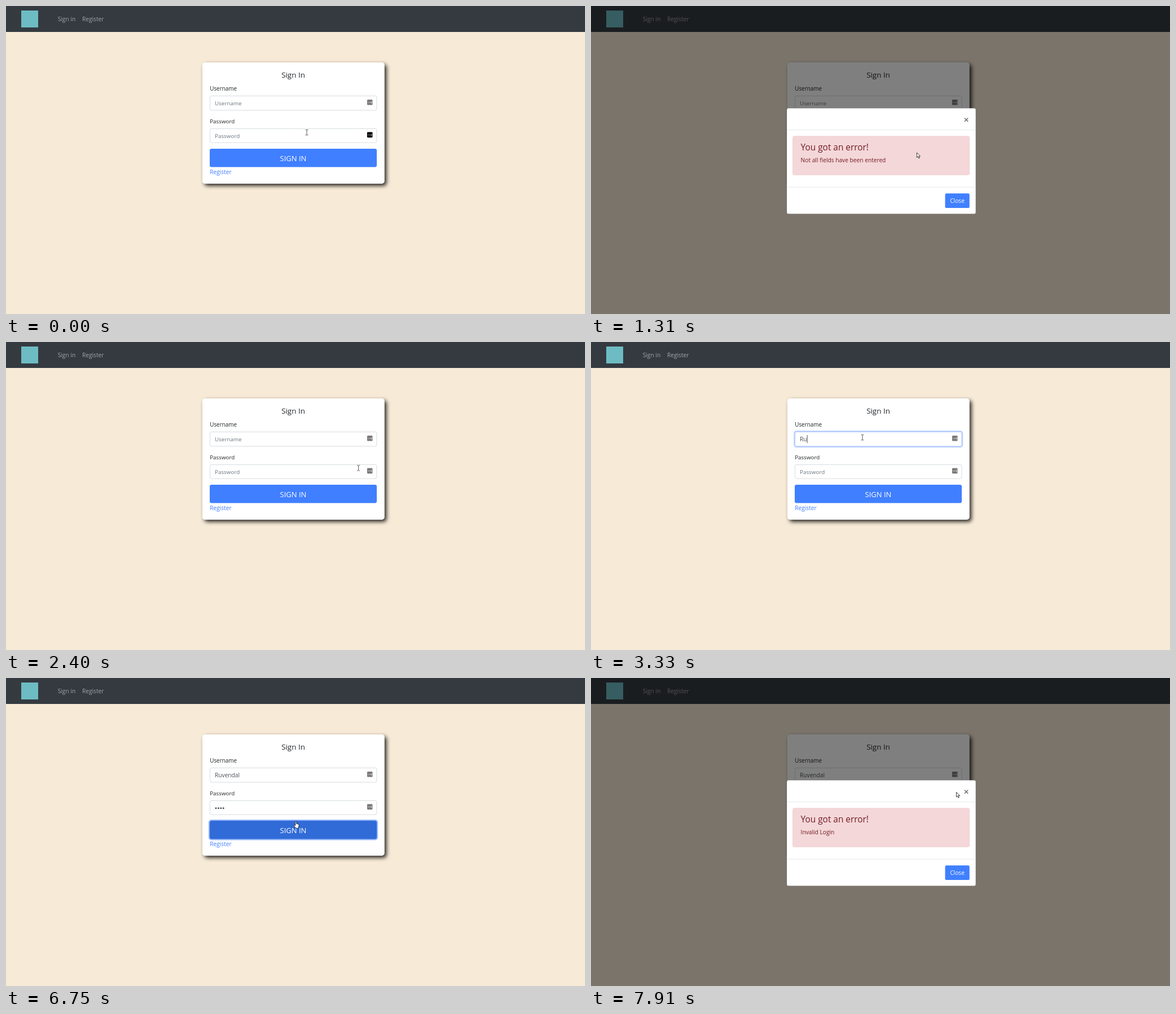
Recreate the animation shown at these times as an HTML page. Size 1026 px wide and 546 px high, loop 8000 ms.

```html
<!DOCTYPE html>
<html lang="en">
<head>
<meta charset="utf-8">
<title>Sign in form</title>
<style>
  html, body { margin: 0; width: 100%; height: 100%; overflow: hidden; background: #f7ead7; }
  svg { display: block; width: 1026px; height: 546px; }
  text { font: 10.2px "Open Sans", "Noto Sans", sans-serif; fill: #212529; white-space: pre; }
  .nav { fill: #fff; fill-opacity: .55; }
  .field { fill: #fff; stroke: #ced4da; stroke-width: .8; }
  .hint { font-size: 9.85px; fill: #6c757d; }
  .value { fill: #495057; }
  .link { fill: #407fff; }
  .light { fill: #fff; }
  .title { font-size: 13.4px; font-weight: 500; }
  .ring { fill: none; stroke: #407fff; stroke-width: 2.2; }
  .alert { fill: #721c24; }
</style>
</head>
<body>
<svg viewBox="0 0 1026 546">
  <defs>
    <filter id="shade" x="-10%" y="-10%" width="120%" height="125%">
      <feDropShadow dx="3.6" dy="3.6" stdDeviation="3.6" flood-color="#000" flood-opacity=".85"/>
    </filter>
    <g id="badge">
      <rect width="9.6" height="9.6" rx="1.4"/>
      <path d="M1.6 5h1.1M3.4 5h1.1M5.2 5h1.1M7.9 3.2v3.6" stroke="#fff" stroke-width=".9"/>
    </g>
  </defs>

  <rect width="1026" height="546" fill="#f7ead7"/>
  <rect width="1026" height="46" fill="#343a40"/>
  <rect x="27" y="8" width="30" height="30" fill="#6dbcc4"/>
  <text class="nav" x="91.7" y="27.3">Sign in</text>
  <text class="nav" x="134.9" y="27.3">Register</text>

  <rect x="348" y="100" width="322.6" height="215" rx="5" fill="#fff" filter="url(#shade)"/>
  <text class="title" x="509" y="126.7" text-anchor="middle">Sign In</text>
  <text x="361.2" y="150" style="font-size:9.9px">Username</text>
  <text x="361.2" y="208" style="font-size:9.8px">Password</text>

  <rect class="field" x="361.5" y="159.4" width="295.4" height="25.4" rx="2.6"/>
  <g id="userRing">
    <rect class="ring" x="360.2" y="158.1" width="298" height="28" rx="3.6" stroke-opacity=".3"/>
    <rect class="field" x="361.5" y="159.4" width="295.4" height="25.4" rx="2.6" style="stroke:#9fbfff"/>
  </g>
  <text id="userHint" class="hint" x="370" y="176.3">Username</text>
  <text id="userText" class="value" x="370" y="176.3"></text>
  <use href="#badge" x="639.9" y="166" fill="#7d7979"/>

  <rect class="field" x="361.5" y="217.4" width="295.4" height="24.8" rx="2.6"/>
  <g id="passRing">
    <rect class="ring" x="360.2" y="216.1" width="298" height="27.4" rx="3.6" stroke-opacity=".3"/>
    <rect class="field" x="361.5" y="217.4" width="295.4" height="24.8" rx="2.6" style="stroke:#9fbfff"/>
  </g>
  <text id="passHint" class="hint" x="370" y="234.2">Password</text>
  <g id="dots" fill="#495057"></g>
  <use id="passBadge" href="#badge" x="639.9" y="223.6"/>
  <path id="caret" stroke="#222" stroke-width=".8"/>

  <rect id="buttonRing" class="ring" x="360" y="252" width="298" height="34.4" rx="4" stroke-opacity=".55"/>
  <rect id="button" x="361" y="253" width="296" height="32.4" rx="3.2"/>
  <text class="light" x="509" y="274.6" text-anchor="middle" style="font-size:13px">SIGN IN</text>
  <text class="link" x="361.2" y="298">Register</text>

  <rect id="backdrop" width="1026" height="546"/>
  <g id="modal">
    <rect x="347" y="181.2" width="334.8" height="187.4" rx="3" fill="#fff" stroke="#000" stroke-opacity=".2" stroke-width=".6"/>
    <path d="M347 219.6h334.8M347 321.1h334.8" stroke="#dee2e6" stroke-width=".8"/>
    <path d="M661.8 198.5l6.4 6.4M668.2 198.5l-6.4 6.4" stroke="#737373" stroke-width="1.5"/>
    <rect id="outline" x="648.5" y="181.5" width="33" height="38" rx="1" fill="none" stroke="#101010"/>
    <rect x="357.6" y="230.8" width="313" height="68.6" rx="2.6" fill="#f4d7d9" stroke="#f3c8cc" stroke-width=".7"/>
    <text class="alert" x="371.6" y="255.5" style="font-size:15.4px;font-weight:500">You got an error!</text>
    <text id="message" class="alert" x="371.6" y="276.5"></text>
    <rect x="627.5" y="332.2" width="43.2" height="25.8" rx="2.6" fill="#407fff"/>
    <text class="light" x="649" y="349.3" text-anchor="middle">Close</text>
  </g>

  <g id="pointer">
    <path id="beam" d="M-2.4 -4.6h1.7l.7 .6l.7 -.6h1.7M0 -4v8.2M-2.4 4.8h1.7l.7 -.6l.7 .6h1.7" fill="none" stroke="#444" stroke-width=".9"/>
    <path id="arrow" d="M.4 .4v8.6l2 -1.9l1.5 3.3l1.5 -.7l-1.5 -3.2h2.7z" fill="#fff" stroke="#111" stroke-width=".8"/>
    <path id="hand" d="M-1.2 1q0 -1 1 -1t1 1v3.4l3 .6q1.5 .4 1.4 1.9l-.7 3.3v2h-4.900l-2.800 -3.800q-1 -1.400 0 -1.700t2 .9z" fill="#fff" stroke="#111" stroke-width=".8"/>
  </g>
</svg>
<script>
const LOOP = 8000, FRAME = 77.5;
const NAME = "Ruvendal";
const KEYS = [3100, 3330, 3490, 3570, 3740, 3810, 3890, 3960];
const PASS_KEYS = [4650, 4820, 5040, 5130];
// time, x, y of the pointer
const PATH = [
  [70, 533, 224], [380, 561, 271], [1060, 561, 271], [1780, 663, 198],
  [2087, 663, 198], [2170, 659, 209], [2560, 560, 250], [2710, 515, 258], [2785, 481, 169],
  [5700, 481, 169], [6200, 512, 262], [6500, 514, 254],
  [7390, 514, 254], [7840, 640, 203], [7900, 647, 202]
];

const $ = id => document.getElementById(id);
const clamp = v => Math.max(0, Math.min(1, v));
const ramp = (t, from, span) => clamp((t - from) / span);
const set = (id, attrs) => { for (const k in attrs) $(id).setAttribute(k, attrs[k]); };
const show = (id, on) => set(id, { opacity: +on });
const count = (keys, t) => keys.filter(k => t >= k).length;
const easeOut = p => 1 - Math.pow(1 - p, 1.65);

for (let i = 0; i < 4; i++) {
  const dot = document.createElementNS("http://www.w3.org/2000/svg", "circle");
  dot.setAttribute("cx", 372 + i * 4.4);
  dot.setAttribute("cy", 230.8);
  dot.setAttribute("r", 1.5);
  $("dots").append(dot);
}

function pointerAt(t) {
  const i = PATH.findIndex(p => p[0] > t);
  if (i === 0) return PATH[0].slice(1);
  if (i < 0) return PATH[PATH.length - 1].slice(1);
  const [a, b] = [PATH[i - 1], PATH[i]];
  const p = (t - a[0]) / (b[0] - a[0]);
  const e = p * p * (3 - 2 * p);
  return [a[1] + (b[1] - a[1]) * e, a[2] + (b[2] - a[2]) * e];
}

function modalAt(t) {
  if (t >= 7030) return { alpha: ramp(t, 7030, 150), slide: easeOut(ramp(t, 7030, 300)) };
  if (t >= 2087) return { alpha: 1 - ramp(t, 2087, 150), slide: 1 - easeOut(ramp(t, 2087, 300)) };
  return { alpha: ramp(t, 536, 150), slide: easeOut(ramp(t, 536, 300)) };
}

function shapeAt(x, y, open) {
  if (open) return x > 648 && y < 220 ? "hand" : "arrow";
  if (x < 361 || x > 657) return "arrow";
  if (y >= 253 && y <= 285) return "hand";
  return (y > 159 && y < 185) || (y > 217 && y < 242) ? "beam" : "arrow";
}

function drawForm(t) {
  const typed = count(KEYS, t), dots = count(PASS_KEYS, t);
  const onUser = t >= 2780 && t < 4100;
  const onPass = t >= 4100 && t < 6560;
  $("userText").textContent = NAME.slice(0, typed);
  show("userHint", !typed);
  show("passHint", !dots);
  [...$("dots").children].forEach((d, i) => d.setAttribute("opacity", +(i < dots)));
  show("userRing", 0);
  set("userRing", { opacity: t < 2780 ? 0 : 1 - ramp(t, 4090, 150) });
  set("passRing", { opacity: ramp(t, 4090, 150) * (1 - ramp(t, 6550, 150)) });
  set("passBadge", { fill: t < 230 || onPass ? "#000" : "#7d7979" });

  const cx = onUser ? 370.6 + (typed ? $("userText").getComputedTextLength() : 0) : 370.6 + dots * 4.3;
  const cy = onUser ? 165 : 223;
  set("caret", { d: `M${cx} ${cy}v14`, opacity: +(onUser || onPass) });

  const hover = ramp(t, 250, 150) * (1 - ramp(t, 540, 100)) +
                ramp(t, 6080, 150) * (1 - ramp(t, 7040, 150));
  const mix = (a, b) => Math.round(a + (b - a) * hover);
  set("button", { fill: `rgb(${mix(64, 49)},${mix(127, 107)},${mix(255, 215)})` });
  set("buttonRing", {
    opacity: ramp(t, 430, 100) * (1 - ramp(t, 540, 80)) +
             ramp(t, 6500, 200) * (1 - ramp(t, 7040, 100))
  });
}

function draw(t) {
  const q = 620 + Math.floor((t - 619) / FRAME) * FRAME;
  const { alpha, slide } = modalAt(q);
  const [x, y] = pointerAt(q);
  const shape = shapeAt(x, y, alpha > 0);

  drawForm(t);
  set("backdrop", { opacity: alpha * .5 });
  set("modal", { opacity: alpha, transform: `translate(0 ${-33.3 * (1 - slide)})` });
  $("message").textContent = t < 5000 ? "Not all fields have been entered" : "Invalid Login";
  show("outline", t >= 1930 && t < 5000);
  set("pointer", { transform: `translate(${x} ${y})` });
  for (const id of ["beam", "arrow", "hand"]) show(id, id === shape);
}

const start = performance.now();
function tick() {
  draw((performance.now() - start) % LOOP);
  requestAnimationFrame(tick);
}
tick();
</script>
</body>
</html>
```
